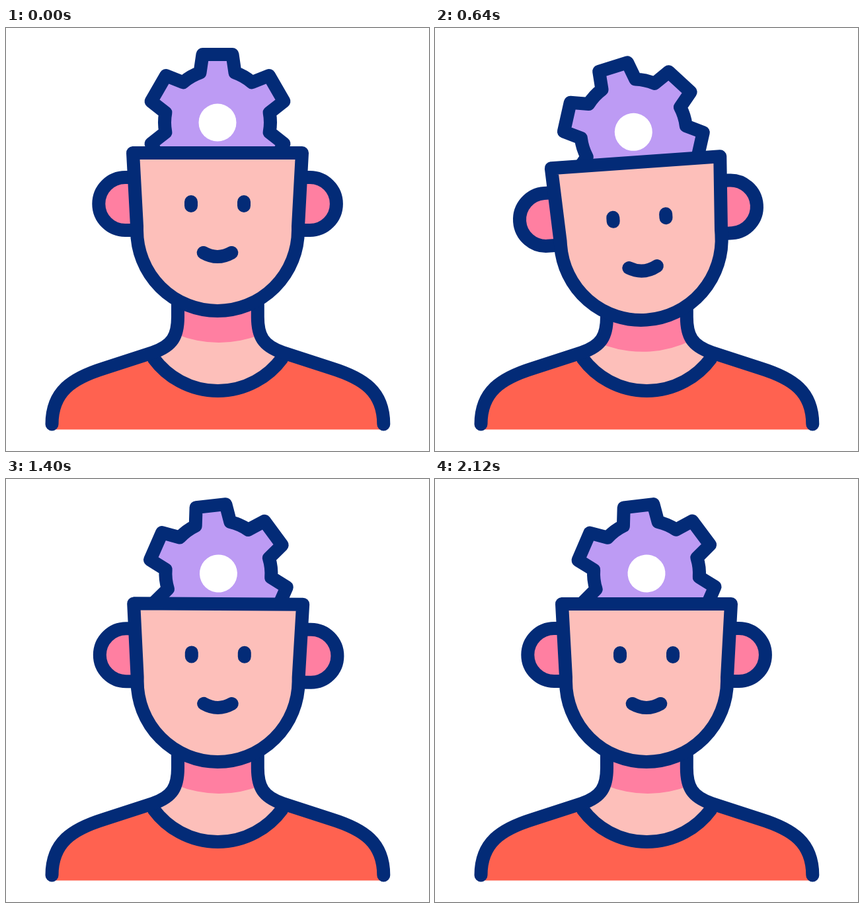
Animation, 640 px wide and 640 px high, one loop 2160 ms. Source, as an HTML page with a canvas:

```html
<!DOCTYPE html>
<html lang="en">
<head>
<meta charset="utf-8">
<title>Thinking head</title>
<style>
html, body { margin: 0; width: 100%; height: 100%; overflow: hidden; background: #fff; }
canvas { display: block; width: 640px; height: 640px; }
</style>
</head>
<body>
<canvas id="stage" width="640" height="640"></canvas>
<script>
const ctx = document.getElementById('stage').getContext('2d');
const LOOP = 2160, STEP = 40, DEG = Math.PI / 180;
const NAVY = '#032b77', PURPLE = '#bd9bf4', SKIN = '#fdbfba',
      PINK = '#ff7fa1', ORANGE = '#ff6250';
const PIVOT = { x: 320, y: 425 };

// Keys are [ms, value] pairs, eased in and out between neighbours.
const tilt  = [[0, 0], [220, 4.4], [660, -4.05], [1080, 2], [1500, 0]];
const dip   = [[0, 0], [437, 24.5], [877, 0]];
const eyeY  = [[225, 0], [560, 8.6], [1000, -9.8], [1455, 0]];
const lipY  = [[195, 0], [540, 10.5], [940, -7.2], [1317, 0]];
const earX  = [[30, 0], [290, 5], [740, -2.5], [1180, 1.9], [1560, 0]];
const earY  = [[30, 0], [290, 5.6], [640, 0], [880, 0], [1180, 2.5], [1560, 0]];

function at(keys, t) {
  if (t <= keys[0][0]) return keys[0][1];
  for (let i = 1; i < keys.length; i++) {
    const [t0, a] = keys[i - 1], [t1, b] = keys[i];
    if (t < t1) {
      const x = (t - t0) / (t1 - t0);
      return a + (b - a) * x * x * (3 - 2 * x);
    }
  }
  return keys[keys.length - 1][1];
}

function gearPath() {
  const p = new Path2D(), base = Math.atan2(26.5, 75.5);
  for (let i = 0; i < 6; i++) {
    const a = i * 60 * DEG, c = Math.cos(a), s = Math.sin(a);
    const corner = x => p.lineTo(x * c + 103 * s, x * s - 103 * c);
    const up = a - Math.PI / 2;
    p.arc(0, 0, 80, up - 60 * DEG + base, up - base);
    corner(-22.5);
    corner(22.5);
  }
  p.closePath();
  return p;
}

const gear = gearPath();
const face = new Path2D('M192 189 H448 L442 300 V306 A122 122 0 0 1 198 306 V300 Z');
const ear = new Path2D('M206 226 H180.3 A40 40 0 0 0 180.3 306 H206');
const eyes = new Path2D('M280 263 V269 M360 263 V269');
const lips = new Path2D('M298.7 340 Q320 352 341.3 340');
const collar = 'A120.5 120.5 0 0 0 417.5 500';
const neck = new Path2D('M260 400 V437 C260 466 252 481 223.5 492 V500 ' + collar +
  ' V492 C389 481 381 466 381 437 V400 Z');
const side = 'M260 405 V437 C260 466 252 481 222 491 L148 515 C100 530 69.5 550 69.5 599.5';
const shoulder = new Path2D(side);
const shirt = new Path2D('M69.5 607.5 V599.5 C69.5 550 100 530 148 515 L223.5 492 V500 ' +
  collar + ' V492 L493 515 C541 530 571.5 550 571.5 599.5 V607.5 Z');
const collarLine = new Path2D('M223.5 500 ' + collar);

function paint(path, fill, line = true) {
  if (fill) {
    ctx.fillStyle = fill;
    ctx.fill(path);
  }
  if (line) ctx.stroke(path);
}

function mirrored(axis, draw) {
  draw();
  ctx.save();
  ctx.transform(-1, 0, 0, 1, 2 * axis, 0);
  draw();
  ctx.restore();
}

function moved(x, y, draw) {
  ctx.save();
  ctx.translate(x, y);
  draw();
  ctx.restore();
}

function inHead(t, draw) {
  ctx.save();
  ctx.translate(PIVOT.x, PIVOT.y + at(dip, t));
  ctx.rotate(at(tilt, t) * DEG);
  ctx.translate(-PIVOT.x, -PIVOT.y);
  draw();
  ctx.restore();
}

function disc(x, y, r, color) {
  ctx.fillStyle = color;
  ctx.beginPath();
  ctx.arc(x, y, r, 0, 2 * Math.PI);
  ctx.fill();
}

function drawBody(t) {
  paint(neck, SKIN, false);
  ctx.save();
  ctx.clip(neck);
  inHead(t, () => disc(322, 308, 168, PINK));
  ctx.restore();
  paint(shirt, ORANGE, false);
  paint(collarLine);
  mirrored(320.4, () => paint(shoulder));
}

function drawHead(t) {
  moved(at(earX, t), at(earY, t), () => mirrored(320.1, () => paint(ear, PINK)));
  moved(320, 143, () => {
    ctx.rotate(t / LOOP * 2 * Math.PI);
    paint(gear, PURPLE);
    disc(0, 0, 28.5, '#fff');
  });
  paint(face, SKIN);
  moved(0, at(eyeY, t), () => paint(eyes));
  moved(0, at(lipY, t), () => paint(lips));
}

function render(t) {
  ctx.fillStyle = '#fff';
  ctx.fillRect(0, 0, 640, 640);
  ctx.strokeStyle = NAVY;
  ctx.lineWidth = 20;
  ctx.lineCap = ctx.lineJoin = 'round';
  drawBody(t);
  inHead(t, () => drawHead(t));
}

const start = performance.now();
function tick() {
  const t = (performance.now() - start + 1) % LOOP;
  render(Math.floor(t / STEP) * STEP);
  requestAnimationFrame(tick);
}
tick();
</script>
</body>
</html>
```
